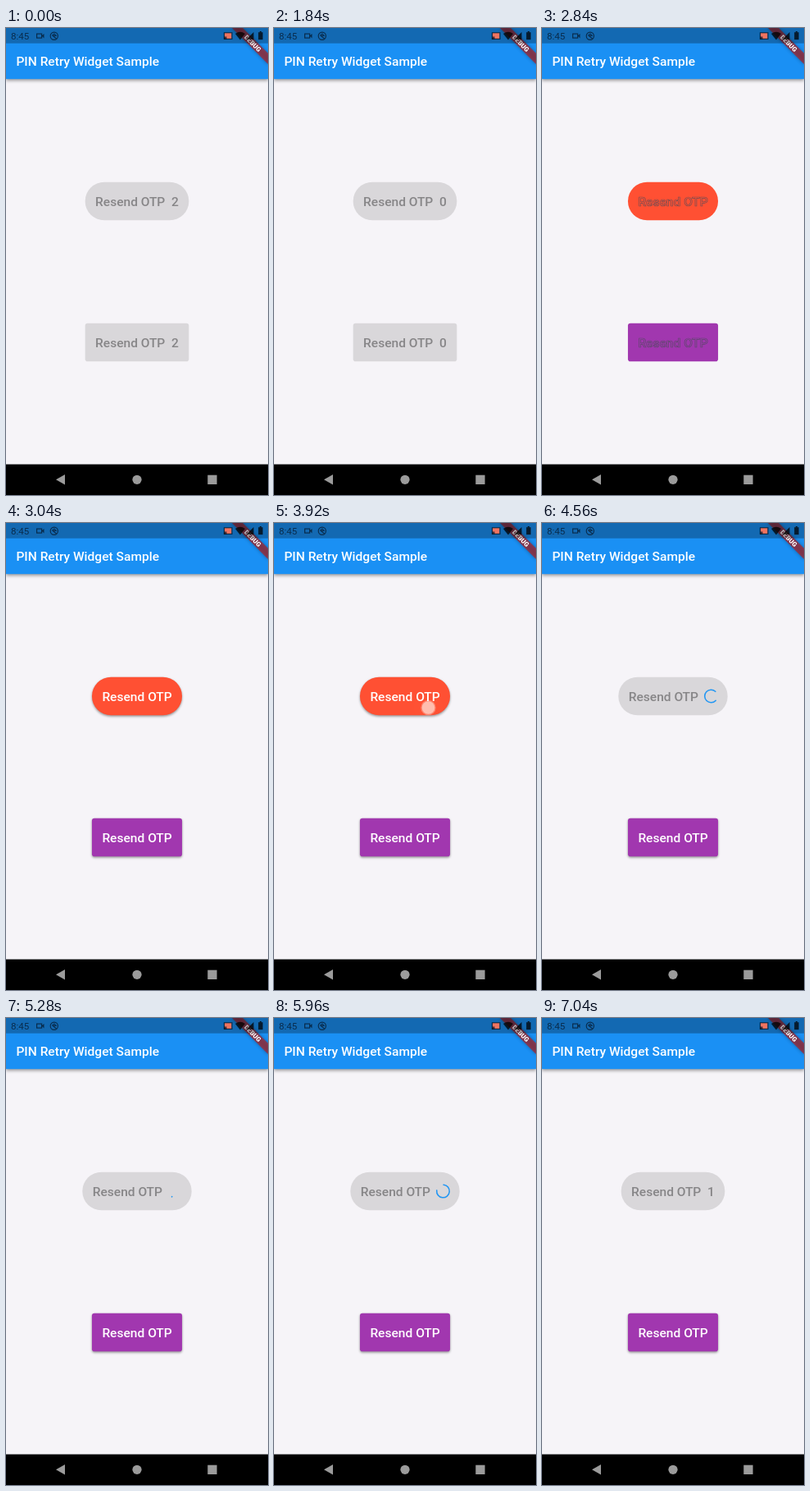
An HTML page with a canvas for the animation above (8 s loop, 320 by 569 pixels).

```html
<!DOCTYPE html>
<html lang="en">
<head>
<meta charset="utf-8">
<title>Resend button</title>
<style>
  html, body { margin: 0; width: 100%; height: 100%; overflow: hidden; background: #f6f4f8; }
  canvas { display: block; }
</style>
</head>
<body>
<canvas id="stage" width="320" height="569"></canvas>
<script>
const ctx = document.getElementById('stage').getContext('2d');
const LOOP = 8000;
const DP = 320 / 411.4;           // pixels per layout unit
const TAU = Math.PI * 2;

// Moments of the story, in ms
const ENABLED = 2840, PRESS = 3920, LOADING = 3975, COUNTING = 6040;

const ORANGE = [255, 80, 51, 1], PURPLE = [161, 55, 175, 1], GREY = [217, 215, 218, 1];
const WHITE = [255, 255, 255, 1], DIM = [0, 0, 0, 0.38];
const INK = 'rgba(5, 22, 40, .72)';

const clamp = x => Math.min(1, Math.max(0, x));
const progress = (t, start, length) => clamp((t - start) / length);
const lerp = (a, b, k) => a + (b - a) * k;
const mix = (a, b, k) => a.map((v, i) => lerp(v, b[i], k));
const css = c => `rgba(${c.join()})`;

function bezier(x1, y1, x2, y2) {
  const at = (a, b, u) => 3 * a * u * (1 - u) ** 2 + 3 * b * u * u * (1 - u) + u ** 3;
  return x => {
    let lo = 0, hi = 1;
    for (let i = 0; i < 20; i++) {
      const mid = (lo + hi) / 2;
      if (at(x1, x2, mid) < x) lo = mid; else hi = mid;
    }
    return at(y1, y2, lo);
  };
}
const ease = bezier(0.25, 0.1, 0.25, 1);
const fastOutSlowIn = bezier(0.4, 0, 0.2, 1);

function rect(x, y, w, h, color) {
  ctx.fillStyle = color;
  ctx.fillRect(x, y, w, h);
}

function poly(color, ...points) {
  ctx.fillStyle = color;
  ctx.beginPath();
  points.forEach(p => ctx.lineTo(...p));
  ctx.fill();
}

function disc(x, y, r, color) {
  ctx.fillStyle = color;
  ctx.beginPath();
  ctx.arc(x, y, r, 0, TAU);
  ctx.fill();
}

function text(str, x, y, size, weight, color) {
  ctx.font = `${weight} ${size}px Roboto, sans-serif`;
  ctx.fillStyle = color;
  ctx.fillText(str, x, y);
}

function shadow(alpha, blur, dy) {
  ctx.shadowColor = `rgba(0, 0, 0, ${alpha})`;
  ctx.shadowBlur = blur;
  ctx.shadowOffsetY = dy;
}

function drawBanner() {
  ctx.save();
  ctx.translate(320, 0);
  ctx.rotate(Math.PI / 4);
  shadow(0.5, 4, 0);
  rect(-40 * DP, 28 * DP, 80 * DP, 12 * DP, 'rgba(183, 28, 28, .66)');
  shadow(0, 0, 0);
  ctx.textAlign = 'center';
  text('DEBUG', 0, 34 * DP + 2.8, 7.9, 900, '#fff');
  ctx.restore();
}

function drawStatusBar() {
  rect(0, 0, 320, 18.7, 'rgba(0, 0, 0, .27)');
  text('8:45', 6, 14, 11.6, 400, INK);

  ctx.strokeStyle = INK;
  ctx.lineWidth = 1.2;
  ctx.strokeRect(37.6, 7.1, 6, 5);
  poly(INK, [43.6, 9.6], [46.5, 7], [46.5, 12.4]);

  ctx.beginPath();
  ctx.arc(58.8, 9.7, 4.6, 0, TAU);
  ctx.moveTo(56.5, 9);
  ctx.lineTo(59, 7.2);
  ctx.lineTo(61, 9.3);
  ctx.lineTo(57.5, 9.7);
  ctx.lineTo(61.5, 13);
  ctx.stroke();

  rect(267, 6, 8.5, 7, '#ef7461');
  ctx.strokeRect(266.5, 5.8, 9.5, 7.6);
  rect(266, 10.5, 3.5, 3.5, INK);

  const dark = 'rgba(0, 0, 0, .75)';
  poly(dark, [280, 7], [283, 5.3], [286, 4.8], [289, 5.3], [292, 7], [286, 14.5]);
  poly(dark, [293.5, 14], [302.5, 14], [302.5, 5]);
  rect(308.2, 5.2, 5.4, 9, dark);
  rect(309.8, 4, 2.2, 1.2, dark);
}

function drawFrame() {
  rect(0, 0, 320, 569, '#f6f4f8');
  shadow(0.4, 4, 1.5);
  rect(0, 0, 320, 62.2, '#1a90f4');
  shadow(0, 0, 0);
  text('PIN Retry Widget Sample', 12.4, 46.2, 20 * DP, 500, '#fff');
  drawBanner();
  drawStatusBar();

  rect(0, 531.6, 320, 38, '#000');
  poly('#9b9b9b', [61, 550.3], [72, 544], [72, 556.6]);
  disc(160, 550.3, 5.6, '#9b9b9b');
  rect(246.3, 544.7, 11.3, 11.3, '#9b9b9b');
}

// Indeterminate ring: head runs ahead, tail catches up, all of it rotating
function drawSpinner(x, y, age) {
  const phase = age / 1333 % 1;
  const head = fastOutSlowIn(clamp(phase * 2));
  const tail = fastOutSlowIn(clamp(phase * 2 - 1));
  const start = -TAU / 4 + tail * TAU * 0.75 + age / 2222 * TAU + phase * TAU / 4;
  ctx.strokeStyle = '#2196f3';
  ctx.lineWidth = 2 * DP;
  ctx.lineCap = 'square';
  ctx.beginPath();
  ctx.arc(x, y, 10 * DP, start, start + Math.max((head - tail) * TAU * 0.75, 0.001));
  ctx.stroke();
  ctx.lineCap = 'butt';
}

function drawRipple(t) {
  const k = ease(progress(t, LOADING - 10, 225));
  const alpha = 0.24 * progress(t, PRESS, 75) * (1 - progress(t, LOADING + 215, 150));
  disc(lerp(188.5, 160, k), lerp(225, 211, k), lerp(18, 64, k), `rgba(255, 255, 255, ${alpha})`);
}

function drawButton(t, y, color, radius, state) {
  const label = 'Resend OTP', pad = 16 * DP, gap = 10 * DP, h = 60 * DP;
  ctx.font = `500 ${20 * DP}px Roboto, sans-serif`;
  const labelWidth = ctx.measureText(label).width;
  const extra = { count: gap + ctx.measureText('0').width, load: gap + 20 * DP, ready: 0 }[state];
  const w = labelWidth + extra + pad * 2;
  const x = 160 - w / 2, textX = x + pad, base = y + 5.6;

  let fill = GREY, ink = DIM, lift = 0;
  if (state === 'ready') {
    const k = progress(t, ENABLED, 200);
    fill = color;
    ink = mix(DIM, WHITE, k);
    lift = k;
  } else if (state === 'load') {
    const k = progress(t, LOADING, 200);
    fill = mix(color, GREY, progress(t, LOADING + 200, 200));
    ink = mix(WHITE, DIM, k);
    lift = 1 - k;
  }

  ctx.save();
  ctx.beginPath();
  ctx.roundRect(x, y - h / 2, w, h, radius);
  shadow(0.4 * lift, 3, 1.4);
  ctx.fillStyle = css(fill);
  ctx.fill();
  shadow(0, 0, 0);
  if (color === ORANGE && t >= PRESS && t < LOADING + 400) {
    ctx.clip();
    drawRipple(t);
  }
  ctx.restore();

  // Label flashes as an outline while its colour turns over
  if (state === 'ready' && t < ENABLED + 40) {
    ctx.strokeStyle = 'rgba(75, 75, 90, .8)';
    ctx.lineWidth = 0.7;
    ctx.strokeText(label, textX, base);
  } else {
    text(label, textX, base, 20 * DP, 500, css(ink));
  }

  const sideX = textX + labelWidth + gap;
  if (state === 'count') {
    const left = t < ENABLED ? (t < 800 ? 2 : t < 1800 ? 1 : 0) : (t < 7040 ? 2 : 1);
    text(left, sideX, base, 20 * DP, 500, css(DIM));
  } else if (state === 'load') {
    drawSpinner(sideX + 10 * DP, y, t - LOADING);
  }
}

function draw(t) {
  drawFrame();
  const first = t < ENABLED ? 'count' : t < LOADING ? 'ready' : t < COUNTING ? 'load' : 'count';
  drawButton(t, 211, ORANGE, 30 * DP, first);
  drawButton(t, 383, PURPLE, 4 * DP, t < ENABLED ? 'count' : 'ready');
  if (t >= PRESS && t < LOADING) {
    disc(188.5, 225, 9.2, 'rgba(255, 225, 215, .35)');
    disc(188.5, 225, 7.8, 'rgba(255, 228, 220, .6)');
  }
}

const origin = performance.now();
function tick() {
  draw((performance.now() - origin) % LOOP);
  requestAnimationFrame(tick);
}
tick();
</script>
</body>
</html>
```
